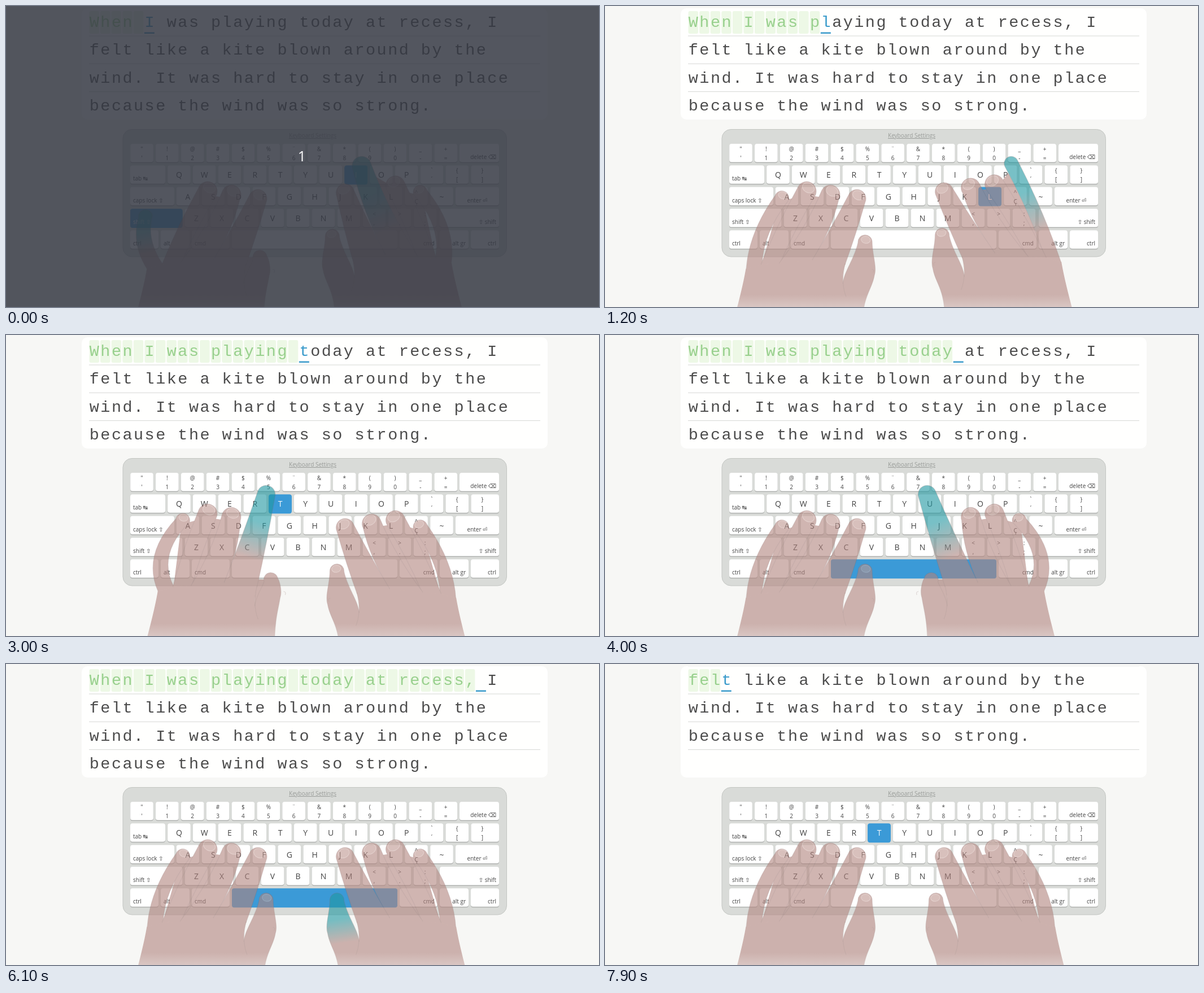
These frames come from a looping animation (1050 px wide and 533 px high, 8 s). An HTML page:

```html
<!DOCTYPE html>
<html lang="en">
<head>
<meta charset="utf-8">
<title>Typing lesson</title>
<style>
html, body { margin: 0; width: 100%; height: 100%; overflow: hidden; background: #f7f7f5; }
svg { display: block; width: 1050px; height: 533px; }
text { fill: #444; text-anchor: middle; font-family: "Open Sans", "DejaVu Sans", sans-serif; }
.lesson text { font: 28.5px "Liberation Mono", monospace; fill: #4c4c4c; }
.lesson .cell { fill: none; }
.lesson .bar { fill: none; }
.lesson .done .cell { fill: #edf8e6; }
.lesson .done text { fill: #98d08d; }
.lesson .now .bar { fill: #3a9bcb; }
.lesson .now text { fill: #3a9bcb; }
.key rect { fill: #fff; }
.key .edge { fill: #afb1af; }
.key.on rect { fill: #3b9ad7; }
.key.on text { fill: #f4f8fb; }
.letter { font-size: 14px; font-weight: 500; }
.small { font-size: 10px; }
.skin { fill: #b1847e; }
.crease { fill: none; stroke: #83615f; stroke-opacity: .35; stroke-width: 1.2; }
.nail { fill: #d9b9b2; fill-opacity: .35; stroke: #f0dcd6; stroke-opacity: .5; }
</style>
</head>
<body>
<svg viewBox="0 0 1050 533">
  <defs>
    <clipPath id="sheet"><rect x="134" y="4" width="825" height="196" rx="10"/></clipPath>
    <linearGradient id="fade" x2="0" y2="1">
      <stop stop-color="#f7f7f5" stop-opacity="0"/><stop offset="1" stop-color="#f7f7f5" stop-opacity=".3"/>
    </linearGradient>
  </defs>
  <rect width="1050" height="533" fill="#f7f7f5"/>
  <rect x="134" y="4" width="825" height="197" rx="10" fill="#fffffe"/>
  <g clip-path="url(#sheet)"><g id="lesson" class="lesson"></g></g>
  <rect x="207" y="218.500" width="679.500" height="225.500" rx="16" fill="#d9dbd8" stroke="#c3c6c2"/>
  <text x="543" y="233" font-size="10" style="fill:#999c99" text-decoration="underline">Keyboard Settings</text>
  <g id="keyboard"></g>
  <g id="left" opacity=".6"></g>
  <g id="right" opacity=".6" transform="matrix(-1 0 0 1 1046.500 0)"></g>
  <rect y="511" width="1050" height="22" fill="url(#fade)"/>
  <g id="countdown">
    <rect width="1050" height="533" fill="#353943" opacity=".85"/>
    <text x="524" y="275" font-size="25" style="fill:#fff">1</text>
  </g>
</svg>
<script>
const LOOP = 8000, MIRROR = 1046.5, ROW = 49.3, PITCH = 19.57;
const $ = id => document.getElementById(id);
const clamp = v => Math.max(0, Math.min(1, v));
const escape = s => s.replace(/&/g, '&amp;').replace(/</g, '&lt;');

// Lesson text
const lines = [
  'When I was playing today at recess, I ',
  'felt like a kite blown around by the ',
  'wind. It was hard to stay in one place ',
  'because the wind was so strong.'
];
const letters = lines.join('');
$('lesson').innerHTML = lines.map((line, r) => {
  const y = 4 + r * ROW;
  const cells = [...line].map((c, i) => {
    const x = 147.5 + i * PITCH;
    return `<g class="char"><rect class="cell" x="${x}" y="${y + 5}" width="17.5" height="40" rx="3"/>
      <rect class="bar" x="${x - .5}" y="${y + 42.5}" width="18" height="2.500"/>
      <text x="${x + 8.8}" y="${y + 33}">${c}</text></g>`;
  }).join('');
  return cells + `<rect x="147" y="${y + 48.5}" width="799" height="1" fill="#d6d7d5"/>`;
}).join('');
const chars = [...document.querySelectorAll('.char')];

// Keyboard
const keyInfo = {};
let keyMarkup = '';
const rowTop = r => 244 + r * 38.3;

function addKey(name, row, x1, x2, labels) {
  const y = rowTop(row), w = x2 - x1;
  keyInfo[name] = { x: (x1 + x2) / 2, y: y + 17, row };
  keyMarkup += `<g class="key" data-name="${escape(name)}">
    <rect class="edge" x="${x1}" y="${y + 1}" width="${w}" height="33" rx="4"/>
    <rect x="${x1}" y="${y}" width="${w}" height="32.500" rx="4"/>${labels}</g>`;
}
const label = (s, x, y, cls = 'small', anchor = 'middle') =>
  `<text class="${cls}" x="${x}" y="${y}" style="text-anchor:${anchor}">${escape(s)}</text>`;

function addRow(row, x, pitch, upper, lower) {
  const y = rowTop(row);
  [...lower].forEach((c, i) => {
    const cx = x + i * pitch, top = upper[i];
    const text = !top || top === ' '
      ? label(c, cx, y + 22, 'letter')
      : label(top, cx, y + 13) + label(c, cx, y + 29);
    const wide = row === 1 && i === 12;
    addKey(c.toLowerCase(), row, cx - (wide ? 20 : 20.3), cx + (wide ? 29.5 : 20.3), text);
  });
}
function addWide(name, row, x1, x2, text, align) {
  const x = { start: x1 + 5, end: x2 - 5, middle: (x1 + x2) / 2 }[align];
  addKey(name, row, x1, x2, label(text, x, rowTop(row) + 27, 'small', align));
}
addRow(0, 240.5, 44.85, '"!@#$%¨&*()_+', "'1234567890-=");
addRow(1, 306.5, 44.75, '          `{}', 'QWERTYUIOP´[]');
addRow(2, 322, 44.95, '         ^', 'ASDFGHJKLÇ~');
addRow(3, 337, 45, '       <>:', 'ZXCVBNM,.;');
[
  ['delete', 0, 803, 873, 'delete ⌫', 'end'],
  ['tab', 1, 220, 282, 'tab ↹', 'start'],
  ['caps', 2, 220, 298, 'caps lock ⇧', 'start'],
  ['enter', 2, 796, 873, 'enter ⏎', 'middle'],
  ['shift', 3, 220, 312.5, 'shift ⇧', 'start'],
  ['shiftR', 3, 768, 873, '⇧ shift', 'end'],
  ['ctrl', 4, 220, 270, 'ctrl', 'start'],
  ['alt', 4, 274, 325, 'alt', 'start'],
  ['cmd', 4, 329, 396, 'cmd', 'start'],
  [' ', 4, 400, 693, '', 'middle'],
  ['cmdR', 4, 697, 764, 'cmd', 'end'],
  ['altgr', 4, 768, 819, 'alt gr', 'end'],
  ['ctrlR', 4, 823, 873, 'ctrl', 'end']
].forEach(k => addWide(...k));
$('keyboard').innerHTML = keyMarkup;
const keyNodes = [...document.querySelectorAll('.key')];

// Hands: the right one is the left one mirrored
const INDEX = 3, THUMB = 4;
const fingers = [
  { base: [250, 466, 278, 458], tip: [313, 340], r: 12.5, bend: -21 },
  { base: [276, 458, 310, 455], tip: [357, 328], r: 17, bend: -5 },
  { base: [308, 456, 367, 450], tip: [399, 334], r: 17, bend: 11 },
  { base: [367, 450, 425, 458], tip: [446, 341], r: 16, bend: 2 },
  { base: [421, 492, 470, 560], tip: [461, 419], r: 12.5 }
];
const PALM = 'M228 560L235 533Q246 490 250 466L278 458 308 455 367 450Q400 425 425 456Q419 474 421 492L444 502 456 560Z';

function thumbPath([x, y]) {
  return `M421 492C424 468 441 450 ${x - 13} ${y}A12.5 12.5 0 0 1 ${x + 12} ${y - 2}
    C${x + 12} 440 ${x + 21} 462 ${x + 16} 477C${x + 12} 502 457 512 456 560`;
}
function fingerPath({ base: [ax, ay, bx, by], r }, [x, y], ux, uy, bend) {
  const lx = x + uy * r, ly = y - ux * r, rx = x - uy * r, ry = y + ux * r;
  return `M${ax} ${ay}Q${(ax + lx) / 2 + bend} ${(ay + ly) / 2} ${lx} ${ly}
    A${r} ${r} 0 0 1 ${rx} ${ry}Q${(bx + rx) / 2 + bend} ${(by + ry) / 2} ${bx} ${by}`;
}
const skin = d => `<path class="skin" stroke="#b1847e" stroke-width="1.500" d="${d}"/>`;

function drawHand(side, reach = {}) {
  const { finger, tuck } = reach;
  // A high reach lifts the hand and slides the palm toward the far side.
  const lift = finger < THUMB ? Math.min(0, (reach.y - fingers[finger].tip[1]) * .2) : 0;
  const slide = lift ? -lift * (finger * .85 - .9) : 0;

  const shapes = fingers.map((f, i) => {
    const active = finger === i;
    let tip = i === THUMB ? f.tip : [f.tip[0] - slide, f.tip[1]];
    if (active) tip = [reach.x - slide, reach.y - lift];
    else if (i === THUMB && tuck) tip = [450, 446];
    const mx = (f.base[0] + f.base[2]) / 2, my = (f.base[1] + f.base[3]) / 2;
    const len = Math.hypot(tip[0] - mx, tip[1] - my);
    const ux = (tip[0] - mx) / len, uy = (tip[1] - my) / len;
    const bend = i === 0 ? f.bend - slide * 1.2 : f.bend;
    const d = i === THUMB ? thumbPath(tip) : fingerPath(f, tip, ux, uy, bend);
    return { f, i, active, tip, mx, my, ux, uy, d };
  });

  let out = skin(PALM);
  // Outer fingers that lie side by side leave no gap.
  for (const i of [0, 1]) {
    const [a, b] = [shapes[i], shapes[i + 1]];
    if (Math.hypot(a.tip[0] - b.tip[0], a.tip[1] - b.tip[1]) > 100) continue;
    const back = s => `${s.tip[0] - s.ux * 8} ${s.tip[1] - s.uy * 8}`;
    out += skin(`M${a.f.base[2]} ${a.f.base[3]}L${back(a)} ${back(b)}Z`);
  }
  if (tuck) out += skin('M424 445L450 446 440 500 421 495Z');

  for (const { f, i, active, tip, mx, my, ux, uy, d } of shapes) {
    if (active) {
      out += `<linearGradient id="glow-${side}" gradientUnits="userSpaceOnUse"
        x1="${tip[0]}" y1="${tip[1]}" x2="${mx}" y2="${my}">
        <stop offset=".3" stop-color="#1f97a1"/><stop offset=".7" stop-color="#b1847e"/></linearGradient>`;
    }
    out += `<path class="skin" d="${d}" ${active ? `style="fill:url(#glow-${side})"` : ''}/>
      <path class="crease" d="${d}"/>`;
    if (!active && !(i === THUMB && tuck)) {
      const turn = Math.atan2(ux, -uy) * 180 / Math.PI;
      out += `<ellipse class="nail" rx="${f.r * .65}" ry="${f.r * .5}"
        transform="translate(${tip[0] + ux * f.r * .4} ${tip[1] + uy * f.r * .4}) rotate(${turn})"/>`;
    }
  }
  out += '<path class="crease" d="M425 456Q417 490 427 515M472 466Q477 466 475 472"/>';
  $(side).innerHTML = `<g transform="translate(${slide} ${lift})">${out}</g>`;
}

const leftKeys = ['qaz', 'wsx', 'edc', 'rfvtgb'];
const rightKeys = ['p;ç', 'ol.', 'ik,', 'yhnujm'];
const rowReach = [-16, -16, 4, 0];

function reachFor(c) {
  const low = c.toLowerCase(), pose = {};
  if (c === ' ') return { right: { finger: THUMB, x: 461, y: 419 } };
  if (c !== low) pose.left = { finger: 0, x: 247, y: 373, tuck: true };
  const key = keyInfo[low];
  const isLeft = leftKeys.some(s => s.includes(low));
  const finger = (isLeft ? leftKeys : rightKeys).findIndex(s => s.includes(low));
  const { tip, r } = fingers[finger];
  let x = (isLeft ? key.x : MIRROR - key.x) - 10;
  if (finger === INDEX) x = (x + tip[0]) / 2;
  pose[isLeft ? 'left' : 'right'] = {
    finger, x, y: key.y + rowReach[key.row] + r - 17, tuck: finger === INDEX && key.row === 1
  };
  return pose;
}

// Typing times in tenths of a second, from the sixth letter on
const FIRST = 5, LONG_REACH = 19;
const starts = [0, 2, 4, 6, 7, 8, 10, 12, 14, 16, 18, 20, 22, 24, 30, 34, 35, 37, 38, 40, 41,
  43, 44, 45, 46, 48, 50, 51, 53, 56, 60, 63, 69, 72, 74, 76, 79].map(n => n * 100 - 20);
const poseStarts = starts.map((s, i) => i === 0 ? -100 : i + FIRST === LONG_REACH ? s : s + 100);
const lastBefore = (list, t) => list.reduce((found, s, i) => s <= t ? i : found, 0);

let shownChar = -1, shownPose = '';

function render(t) {
  const current = lastBefore(starts, t) + FIRST;
  const poseStep = lastBefore(poseStarts, t);
  const resting = t > 7000 && t - poseStarts[poseStep] >= 200;

  if (current !== shownChar) {
    shownChar = current;
    chars.forEach((g, i) => g.setAttribute('class', 'char ' + (i < current ? 'done' : i === current ? 'now' : '')));
    const c = letters[current], low = c.toLowerCase();
    keyNodes.forEach(k => {
      const name = k.dataset.name;
      k.classList.toggle('on', name === low || (c !== low && name === 'shift'));
    });
  }
  const poseId = resting ? 'rest' : String(poseStep);
  if (poseId !== shownPose) {
    shownPose = poseId;
    const pose = resting ? {} : reachFor(letters[poseStep + FIRST]);
    drawHand('left', pose.left);
    drawHand('right', pose.right);
  }
  const p = clamp((t - 7250) / 350);
  $('lesson').setAttribute('transform', `translate(0 ${-ROW * p * p * (3 - 2 * p)})`);
  $('countdown').setAttribute('opacity', 1 - clamp((t - 60) / 300));
}

let origin;
function tick(now) {
  origin ??= now;
  render((now - origin) % LOOP);
  requestAnimationFrame(tick);
}
render(0);
requestAnimationFrame(tick);
</script>
</body>
</html>
```
